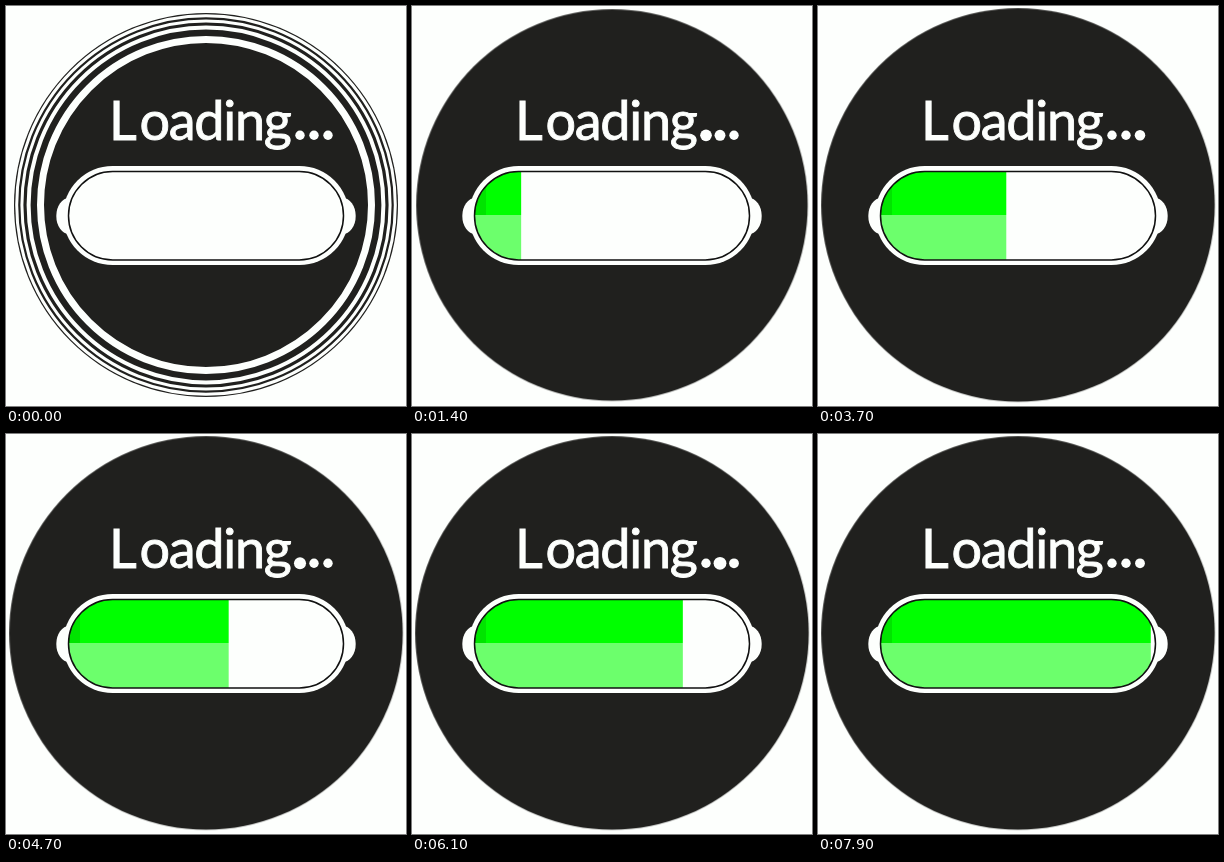
These frames come from a looping animation (400x400 px, 8000 ms). An HTML page:

```html
<!DOCTYPE html>
<html lang="en">
<head>
<meta charset="utf-8">
<title>Loading</title>
<style>
  :root { --light: #fdfffd; --dark: #20201e; }
  html, body { margin: 0; width: 100%; height: 100%; overflow: hidden; background: var(--light); }
  svg { display: block; width: 100vw; height: 100vh; fill: var(--light); }
  text {
    font: 54px Lato, "Open Sans", sans-serif;
    letter-spacing: -1.3px;
    stroke: var(--light);
    stroke-width: 0.9px;
  }

  .badge { transform-origin: 200px 199px; animation: grow 8s steps(18, end) infinite; }
  .disc { fill: var(--dark); }
  .ring {
    fill: none;
    stroke: var(--light);
    stroke-width: var(--w);
    animation: close 8s steps(12, end) infinite;
  }
  .dot { animation: pulse 4s steps(10, end) infinite; }
  .dot.b { animation-delay: -3s; }
  .dot.c { animation-delay: -2s; }
  .cover { animation: reveal 8s steps(80, end) infinite; }

  @keyframes grow {
    0% { transform: scale(1); }
    22.5%, 100% { transform: scale(1.025); }
  }
  @keyframes close {
    0% { stroke-width: var(--w); }
    15%, 100% { stroke-width: 0px; }
  }
  @keyframes pulse {
    0% { r: 4.7px; }
    25% { r: 6.6px; }
    50%, 100% { r: 4.7px; }
  }
  @keyframes reveal {
    from { transform: translateX(0); }
    to { transform: translateX(275.2px); }
  }
</style>
</head>
<body>
<svg viewBox="0 0 400 400">
  <defs>
    <clipPath id="tube"><rect x="62.5" y="165.5" width="275" height="88.5" rx="44.2"/></clipPath>
  </defs>

  <g class="badge">
    <circle class="disc" cx="200" cy="199" r="192"/>
    <circle class="ring" cx="200" cy="199" r="189.3" style="--w: 3px"/>
    <circle class="ring" cx="200" cy="199" r="184.1" style="--w: 3px"/>
    <circle class="ring" cx="200" cy="199" r="177.4" style="--w: 4px"/>
    <circle class="ring" cx="200" cy="199" r="165.5" style="--w: 7px"/>
  </g>

  <text x="103" y="134" dx="0 6">Loading</text>
  <circle class="dot" cx="294" cy="129.3" r="4.7"/>
  <circle class="dot b" cx="308" cy="129.3" r="4.7"/>
  <circle class="dot c" cx="322" cy="129.3" r="4.7"/>

  <!-- Casing with side lugs -->
  <rect x="50.3" y="192" width="299.4" height="36" rx="13" ry="18"/>
  <rect x="57" y="160" width="286" height="99" rx="49.5"/>

  <g clip-path="url(#tube)">
    <rect x="62" y="165" width="276" height="44" fill="#0f0"/>
    <rect x="62" y="209" width="276" height="46" fill="#6cff6c"/>
    <rect x="62" y="180" width="12" height="29" fill="#00e400"/>
    <rect class="cover" x="61" y="165" width="277" height="90"/>
  </g>
  <rect x="62.5" y="165.5" width="275" height="88.5" rx="44.2" fill="none" stroke="#111" stroke-width="1.5"/>
</svg>
</body>
</html>
```
